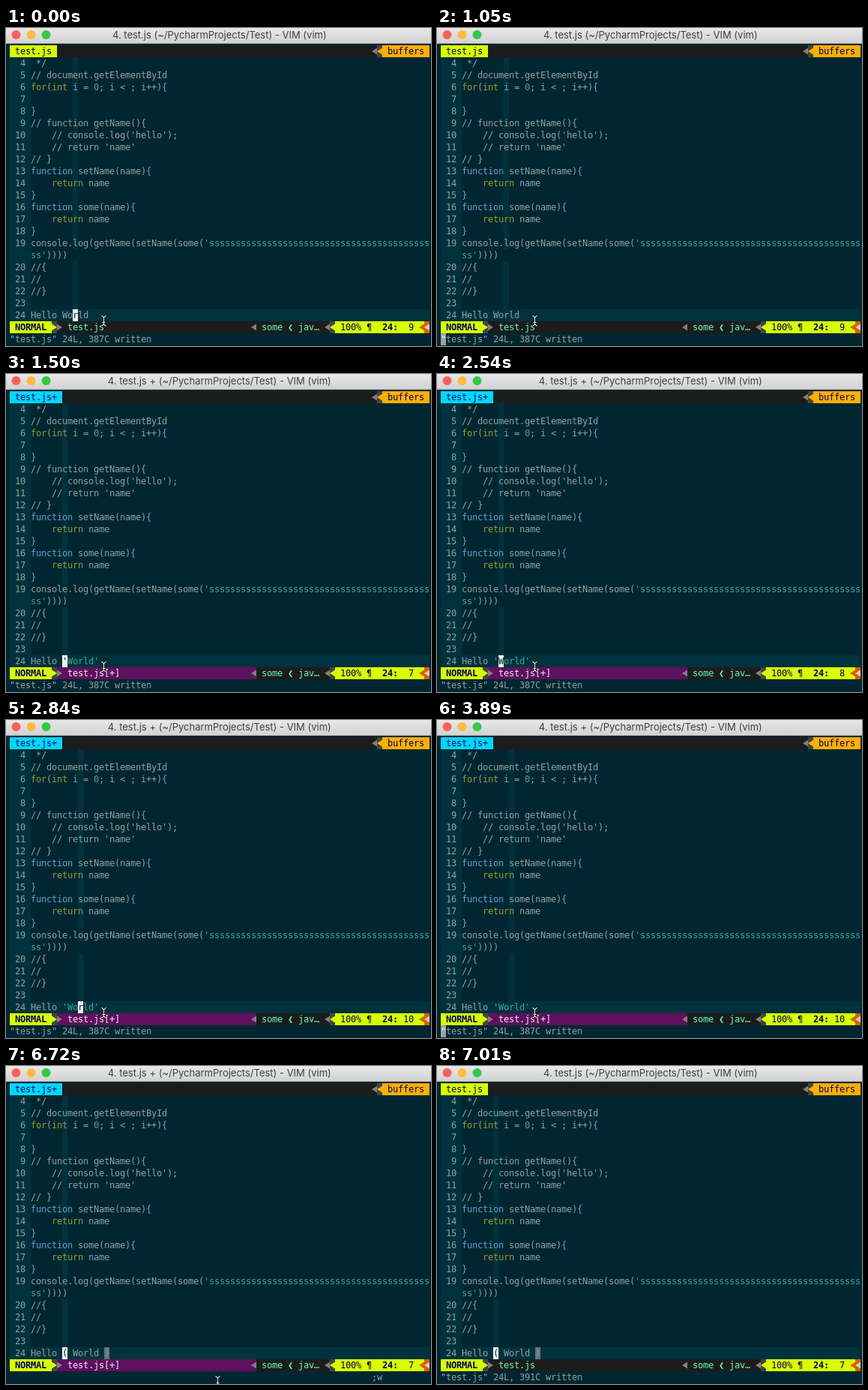
These frames come from a looping animation (567x424 px, 7.91 s). An HTML page with a canvas:

```html
<!DOCTYPE html>
<html lang="en">
<head>
<meta charset="utf-8">
<title>Vim surround</title>
<style>
  html, body { margin: 0; width: 100%; height: 100%; overflow: hidden; background: #002731; }
  canvas { display: block; }
</style>
</head>
<body>
<canvas id="stage" width="567" height="424"></canvas>
<script>
const ctx = document.getElementById('stage').getContext('2d');
const LOOP = 7910, LEFT = 5, TOP = 23, CELL_W = 7, CELL_H = 16, TEXT_COL = 4, WRAP = 76;
const STATUS_ROW = 23, COMMAND_ROW = 24, CURSOR_ROW = 22;
const C = {
  back: '#002731', line: '#00323d', text: '#93a1a1', olive: '#9a9a32', blue: '#62a4d8',
  teal: '#3ea69d', lime: '#d7ff00', navy: '#00005f', dark: '#1c1c1c', slate: '#444444',
  grey: '#808080', purple: '#5f105f', mint: '#5fffaf', cyan: '#00d7ff', amber: '#ffaf00',
  rust: '#d75f00', cursor: '#f4f4f4', match: '#62757a', white: '#eeeeee'
};

const code = [
  ' */',
  '// document.getElementById',
  'for(int i = 0; i < ; i++){',
  '',
  '}',
  '// function getName(){',
  "    // console.log('hello');",
  "    // return 'name'",
  '// }',
  'function setName(name){',
  '    return name',
  '}',
  'function some(name){',
  '    return name',
  '}',
  "console.log(getName(setName(some('" + 's'.repeat(44) + "'))))",
  '//{',
  '//',
  '//}',
  ''
];

// Each step overrides part of the state from its time on.
const steps = [
  { at: 0, text: 'Hello World', col: 9, waiting: false, dirty: false, plus: false,
    message: '"test.js" 24L, 387C written', keys: '', mouse: [130.5, 390.5] },
  { at: 900, keys: 'y' },
  { at: 1050, keys: '', waiting: true },
  { at: 1350, text: "Hello 'World'", col: 7, waiting: false, dirty: true },
  { at: 1500, plus: true },
  { at: 2540, col: 8 },
  { at: 2690, col: 9 },
  { at: 2840, col: 10 },
  { at: 3890, waiting: true },
  { at: 4930, text: 'Hello ( World )', col: 7, waiting: false, message: '' },
  { at: 6130, keys: ';' },
  { at: 6270, keys: ';w' },
  { at: 6570, mouse: [148.5, 394.5] },
  { at: 6720, mouse: [282.5, 420.5] },
  { at: 6860, keys: '', mouse: null, dirty: false, message: '"test.js" 24L, 391C written' },
  { at: 7010, plus: false }
];

const cellX = col => LEFT + col * CELL_W;
const cellY = row => TOP + row * CELL_H;

function fill(col, row, cols, color, rows = 1) {
  ctx.fillStyle = color;
  ctx.fillRect(cellX(col), cellY(row), cols * CELL_W, rows * CELL_H);
}

function put(col, row, text, color, bold = false) {
  ctx.font = (bold ? 'bold ' : '') + '12px "DejaVu Sans Mono", monospace';
  ctx.textAlign = 'left';
  ctx.fillStyle = color;
  [...text].forEach((ch, i) => ctx.fillText(ch, cellX(col + i), cellY(row) + 12));
}

function block(col, row, ch, back, color) {
  fill(col, row, 1, back);
  put(col, row, ch, color);
}

// dir 1 points right, -1 points left
function arrow(col, row, dir, color, back) {
  fill(col, row, 1, back);
  const mid = cellX(col) + 3.5, y = cellY(row) + 8;
  ctx.fillStyle = color;
  ctx.beginPath();
  ctx.moveTo(mid - 3.5 * dir, y - 4.5);
  ctx.lineTo(mid + 3.5 * dir, y);
  ctx.lineTo(mid - 3.5 * dir, y + 4.5);
  ctx.fill();
}

function putCode(row, line) {
  const token = /(\/\/.*| \*\/)|('[^']*')|\b(for|int|return)\b|(function|[{}])|(\d)/g;
  const palette = [C.text, C.teal, C.olive, C.blue, C.teal];
  const colors = Array(line.length).fill(C.text);
  for (const m of line.matchAll(token)) {
    const kind = m.slice(1).findIndex(Boolean);
    colors.fill(palette[kind], m.index, m.index + m[0].length);
  }
  [...line].forEach((ch, i) =>
    put(TEXT_COL + i % WRAP, row + Math.floor(i / WRAP), ch, colors[i]));
}

function drawTitle(plus) {
  const shade = ctx.createLinearGradient(0, 0, 0, 20);
  shade.addColorStop(0, '#e8e8e8');
  shade.addColorStop(1, '#d2d2d2');
  ctx.fillStyle = shade;
  ctx.fillRect(0, 0, 567, 20);
  ctx.fillStyle = '#aeb2b3';
  ctx.fillRect(0, 20, 567, 1);
  ['#fc605c', '#fdbc40', '#34c84a'].forEach((color, i) => {
    ctx.fillStyle = color;
    ctx.beginPath();
    ctx.arc(13.5 + 20 * i, 9, 6, 0, 7);
    ctx.fill();
  });
  ctx.font = '13px Inter, sans-serif';
  ctx.textAlign = 'center';
  ctx.fillStyle = '#404040';
  ctx.fillText(`4. test.js ${plus ? '+ ' : ''}(~/PycharmProjects/Test) - VIM (vim)`, 284.8, 14);
}

function drawTabs(dirty) {
  const label = dirty ? 'test.js+' : 'test.js';
  fill(0, 0, 80, C.dark);
  fill(0, 0, label.length + 2, dirty ? C.cyan : C.lime);
  put(1, 0, label, C.navy);
  arrow(69, 0, -1, C.grey, C.dark);
  arrow(70, 0, -1, C.amber, C.slate);
  fill(71, 0, 9, C.amber);
  put(72, 0, 'buffers', C.navy);
}

function drawEditor(s) {
  const cursorCol = TEXT_COL + s.col - 1;
  fill(0, 1, TEXT_COL, C.line, 22);
  fill(cursorCol, 1, 1, C.line, 22);
  fill(TEXT_COL, CURSOR_ROW, WRAP, C.line);
  let row = 1;
  [...code, s.text].forEach((line, i) => {
    put(1, row, String(i + 4).padStart(2), C.text);
    const rows = Math.max(1, Math.ceil(line.length / WRAP));
    if (rows > 1) fill(cursorCol, row + 1, 1, C.back, rows - 1);
    putCode(row, line);
    row += rows;
  });
  if (s.waiting) return;
  const ch = s.text[s.col - 1];
  block(cursorCol, CURSOR_ROW, ch, C.cursor, C.back);
  if (ch === '(') block(TEXT_COL + s.text.indexOf(')'), CURSOR_ROW, ')', C.match, C.text);
}

function drawStatus(s) {
  const r = STATUS_ROW, middle = s.dirty ? C.purple : C.dark;
  fill(0, r, 8, C.lime);
  put(1, r, 'NORMAL', C.navy, true);
  arrow(8, r, 1, C.lime, C.slate);
  fill(9, r, 38, middle);
  arrow(9, r, 1, C.grey, middle);
  put(11, r, s.dirty ? 'test.js[+]' : 'test.js', s.dirty ? C.white : C.mint);
  arrow(46, r, -1, C.grey, middle);
  fill(47, r, 13, C.dark);
  put(48, r, 'some ❮ jav…', C.mint);
  arrow(60, r, -1, C.grey, C.dark);
  arrow(61, r, -1, C.lime, C.slate);
  fill(62, r, 16, C.lime);
  put(63, r, '100% ¶', C.navy);
  put(71, r, '24:', C.navy, true);
  put(75, r, String(s.col).padStart(2), C.navy);
  arrow(78, r, -1, C.rust, C.lime);
  arrow(79, r, -1, '#e0c8b8', C.rust);
}

function drawCommand(s) {
  put(0, COMMAND_ROW, s.message, C.text);
  put(69, COMMAND_ROW, s.keys, C.text);
  if (s.waiting) block(0, COMMAND_ROW, '"', '#9aa3a3', C.white);
}

function drawMouse([x, y]) {
  const beam = new Path2D(`M${x - 3} ${y - 7}L${x} ${y - 4.5}L${x + 3} ${y - 7}
    M${x} ${y - 4.5}V${y + 4.5}M${x - 3} ${y + 7}L${x} ${y + 4.5}L${x + 3} ${y + 7}
    M${x - 2} ${y + 2}H${x + 2}`);
  [['#000000', 2.4], ['#f0f0f0', 1.1]].forEach(([color, width]) => {
    ctx.strokeStyle = color;
    ctx.lineWidth = width;
    ctx.stroke(beam);
  });
}

function draw(now) {
  const t = now % LOOP;
  const state = Object.assign({}, ...steps.filter(step => step.at <= t));
  ctx.fillStyle = C.back;
  ctx.fillRect(0, 0, 567, 424);
  drawTitle(state.plus);
  drawTabs(state.dirty);
  drawEditor(state);
  drawStatus(state);
  drawCommand(state);
  if (state.mouse) drawMouse(state.mouse);
}

const start = performance.now();
function tick() {
  draw(performance.now() - start);
  requestAnimationFrame(tick);
}
tick();
</script>
</body>
</html>
```
